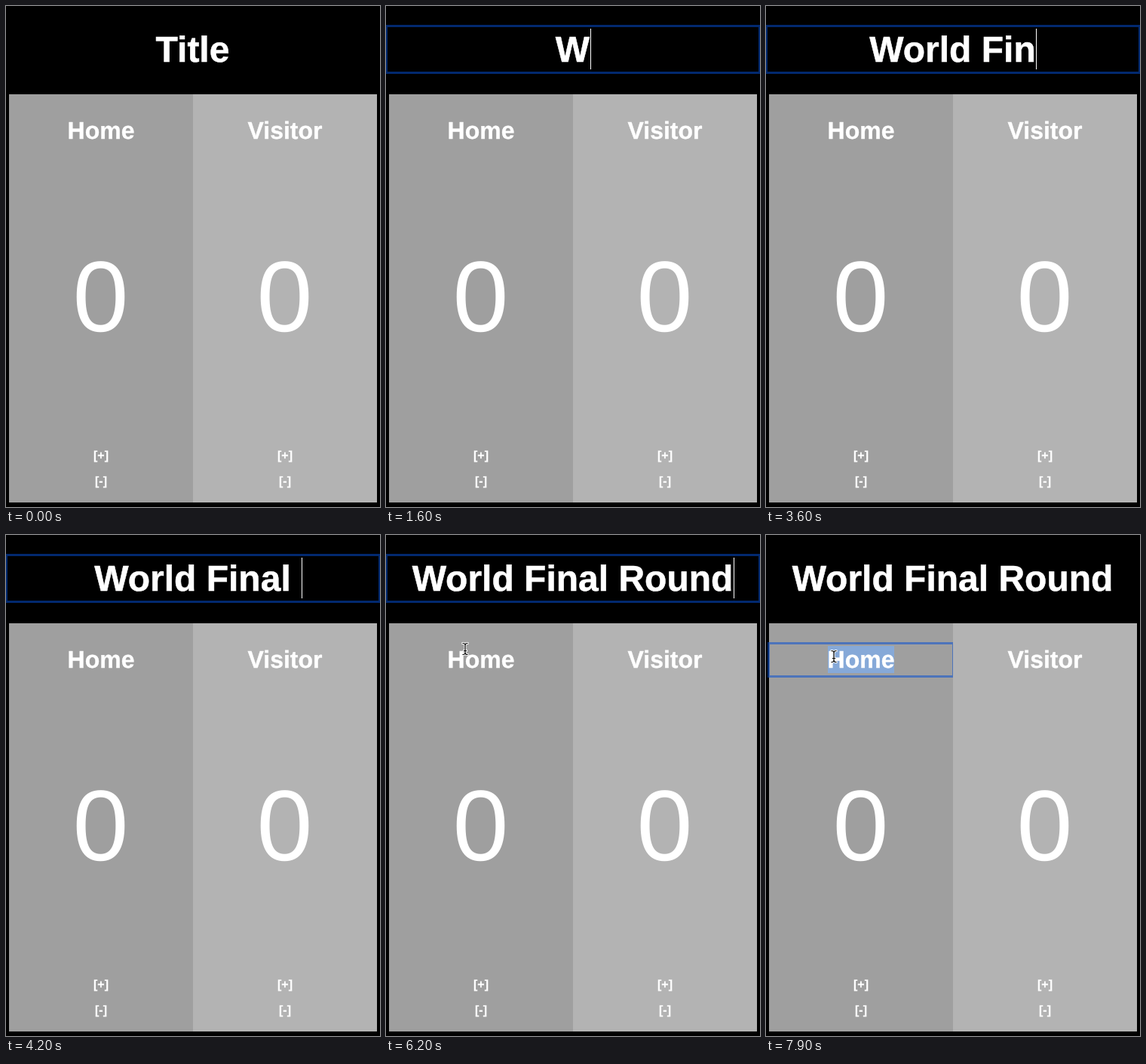
Animation of 496x664 px, one loop 8 s. Source, as an HTML page:

```html
<!DOCTYPE html>
<html lang="en">
<head>
<meta charset="utf-8">
<title>Scoreboard</title>
<style>
  html, body { margin: 0; width: 100%; height: 100%; overflow: hidden; background: #000; }
  svg { display: block; width: 496px; height: 664px; }
  text {
    font-family: "Liberation Sans", Arial, sans-serif;
    font-weight: bold;
    fill: #fff;
    stroke: #fff;
    stroke-width: .012em;
    text-anchor: middle;
    text-rendering: geometricPrecision;
  }
  .title { font-size: 48px; }
  .team { font-size: 32px; }
  .score { font-size: 133px; font-weight: normal; stroke: none; }
  .button { font-size: 16px; }
  .ring { fill: none; stroke: rgba(4, 78, 210, .53); stroke-width: 3; }
  .caret { fill: #fff; shape-rendering: crispEdges; }
</style>
</head>
<body>
<svg viewBox="0 0 496 664">
  <defs>
    <path id="beam" fill="none" stroke-linecap="square"
      d="M-3 -7.5 Q0 -7.5 0 -5 Q0 -7.5 3 -7.5 M0 -5 V5 M-3 7.5 Q0 7.5 0 5 Q0 7.5 3 7.5 M-1.5 2.5 H1.5"/>
  </defs>
  <rect width="496" height="664"/>

  <rect id="titleRing" class="ring" x=".5" y="26.5" width="495" height="62"/>
  <rect id="titleSelection" x="199" y="30" width="98" height="54" fill="#4c7098"/>
  <text id="title" class="title" x="247.5" y="74">Title</text>
  <rect id="titleCaret" class="caret" y="30" width="1" height="54"/>

  <rect x="4" y="117" width="244" height="541" fill="#9f9f9f"/>
  <rect id="homeRing" class="ring" x="3.5" y="143.5" width="245" height="44"/>
  <rect id="homeSelection" x="82" y="147" width="88" height="36" fill="#86a9d8"/>
  <text class="team" x="126" y="175.5">Home</text>
  <rect id="homeCaret" class="caret" x="82" y="147" width="1" height="36"/>
  <text class="score" x="125.5" y="430.5">0</text>
  <text class="button" x="126" y="601">[+]</text>
  <text class="button" x="126" y="635">[-]</text>

  <rect x="248" y="117" width="244" height="541" fill="#b3b3b3"/>
  <text class="team" x="370" y="175.5">Visitor</text>
  <text class="score" x="369.5" y="430.5">0</text>
  <text class="button" x="370" y="601">[+]</text>
  <text class="button" x="370" y="635">[-]</text>

  <g id="pointer">
    <use href="#beam" stroke="#fff" stroke-width="3"/>
    <use href="#beam" stroke="#000" stroke-width="1.2"/>
  </g>
</svg>
<script>
const LOOP = 8000, STEP = 100, BLINK = 500;
const CENTER = 248, SPACE = 13.34;
const TITLE_CLICK = 900, TITLE_SELECT = 1000, HOME_CLICK = 6400, HOME_SELECT = 6700;

const words = [
  { text: "World ", start: 1600, pace: 220 },
  { text: "Final ", start: 3200, pace: 180 },
  { text: "Round", start: 4300, pace: 175 }
];

const glides = [
  { start: 100, end: 500, hide: 1400, from: [275, 125], to: [254, 68] },
  { start: 5800, end: 6300, hide: LOOP, from: [239, 64], to: [90, 161] }
];

const el = id => document.getElementById(id);
const title = el("title"), titleCaret = el("titleCaret"), pointer = el("pointer");
const show = (id, on) => el(id).setAttribute("visibility", on ? "visible" : "hidden");
const during = (t, from, to) => t >= from && t < to;
const snap = t => Math.round(t / STEP) * STEP;
const easeInOut = p => p * p * (3 - 2 * p);

const keys = words.flatMap(({ text, start, pace }) =>
  [...text].map((letter, i) => ({ letter, time: snap(start + i * pace) })));

function drawTitle(t) {
  const typed = keys.filter(key => key.time <= t);
  if (!typed.length) {
    title.textContent = "Title";
    titleCaret.setAttribute("x", 257);
    show("titleCaret", during(t, TITLE_CLICK, TITLE_SELECT));
    return;
  }
  const text = typed.map(key => key.letter).join("");
  const shown = text.trimEnd();
  title.textContent = shown;
  // A trailing space moves the caret without shifting the centred text.
  const hanging = (text.length - shown.length) * SPACE;
  titleCaret.setAttribute("x", Math.round(CENTER + title.getComputedTextLength() / 2 + hanging));
  const lit = Math.floor((t - typed.at(-1).time) / BLINK) % 2 === 0;
  show("titleCaret", t < HOME_CLICK && lit);
}

function drawPointer(t) {
  const glide = glides.find(g => during(t, g.start, g.hide));
  show("pointer", glide);
  if (!glide) return;
  const { start, end, from, to } = glide;
  const p = easeInOut(Math.min(1, (t - start) / (end - start)));
  const [x, y] = from.map((a, i) => Math.round(a + (to[i] - a) * p));
  pointer.setAttribute("transform", `translate(${x} ${y})`);
}

function draw(t) {
  drawTitle(t);
  drawPointer(t);
  show("titleRing", during(t, TITLE_CLICK, HOME_CLICK));
  show("titleSelection", during(t, TITLE_SELECT, words[0].start));
  show("homeRing", t >= HOME_CLICK);
  show("homeCaret", during(t, HOME_CLICK, HOME_SELECT));
  show("homeSelection", t >= HOME_SELECT);
}

function tick() {
  const t = performance.now() % LOOP;
  draw(Math.floor(t / STEP) * STEP);
  requestAnimationFrame(tick);
}
tick();
</script>
</body>
</html>
```
